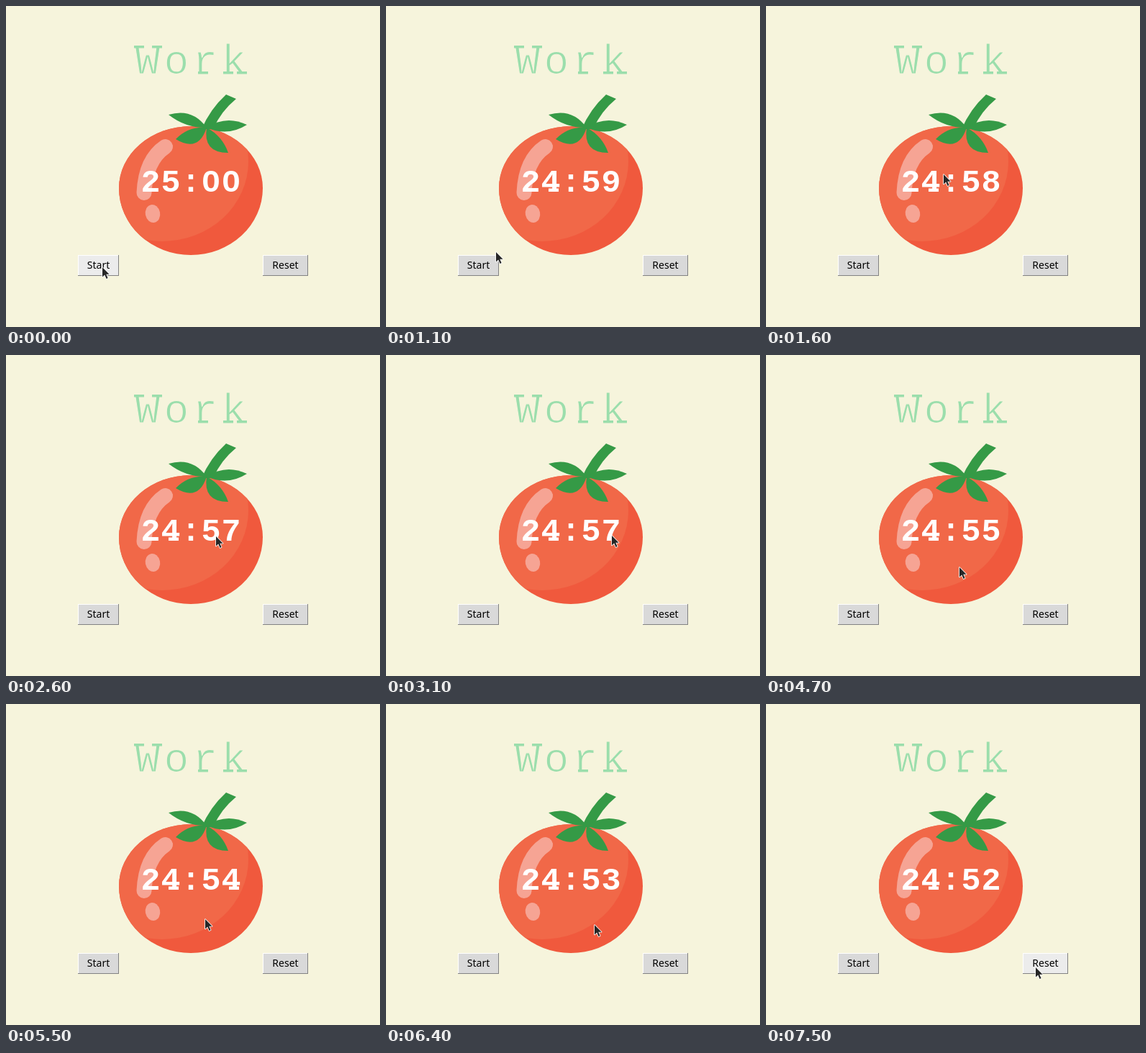
An HTML page with a canvas that plays this animation: 520x446 px, repeating every 8.2 s.

```html
<!DOCTYPE html>
<html lang="en">
<head>
<meta charset="utf-8">
<title>Work timer</title>
<style>
  html, body { margin: 0; width: 100%; height: 100%; overflow: hidden; background: #f6f4dc; }
  canvas { display: block; }
</style>
</head>
<body>
<canvas id="stage" width="520" height="446"></canvas>
<script>
const ctx = document.getElementById('stage').getContext('2d');
const LOOP = 8200, STEP = 100;
const C = {
  paper: '#f6f4dc', mint: '#9bdeac', flesh: '#f16848', shade: '#f0593d',
  shine: '#f6a494', leaf: '#359a46', button: '#d9d9d9', hover: '#ececec', edge: '#828282'
};
const MONO = '"Liberation Mono", monospace';
const HUB = { x: 279, y: 169 };

const stem = new Path2D('M306 123L320 129Q299 146 288 171H272Q284 143 306 123Z');
const gleam = new Path2D('M221.5 195.5Q194 214 192 259.5');
const arrow = new Path2D('M0 0V13.5L3.2 10.6L5.6 16L7.6 15.1L5.3 9.8H9.6Z');

const buttons = [
  { label: 'Start', x: 100, w: 57 },
  { label: 'Reset', x: 357, w: 63 }
];
const BTN_Y = 346, BTN_H = 29;

// Pointer moves: leave, arrive, x, y; it rests in between
const home = { x: 133, y: 361 };
const moves = [
  [1000, 1600, 246, 232], [1600, 1900, 223, 239], [1900, 2200, 277, 251],
  [2300, 3200, 318, 249], [3200, 3600, 210, 281], [3600, 3700, 228, 285],
  [4000, 4300, 248, 318], [4300, 4700, 268, 293], [5000, 6400, 289, 305],
  [6400, 7100, 391, 362], [7200, 7500, 374, 364]
];

function pointerAt(t) {
  let { x, y } = home;
  for (const [leave, arrive, toX, toY] of moves) {
    const k = Math.min(1, Math.max(0, (t - leave) / (arrive - leave)));
    x += (toX - x) * k;
    y += (toY - y) * k;
  }
  return { x: Math.round(x), y: Math.round(y) };
}

function clockAt(t) {
  const left = 1500 - Math.floor((t + 600) / 1000);
  const two = n => String(n).padStart(2, '0');
  return two(Math.floor(left / 60)) + ':' + two(left % 60);
}

function rect(x, y, w, h, color) {
  ctx.fillStyle = color;
  ctx.fillRect(x, y, w, h);
}

function oval(x, y, rx, ry, color, turn = 0) {
  ctx.fillStyle = color;
  ctx.beginPath();
  ctx.ellipse(x, y, rx, ry, turn, 0, Math.PI * 2);
  ctx.fill();
}

// A leaf from the hub to a tip; a and b bow its two edges sideways
function leaf(tipX, tipY, a, b) {
  const dx = tipX - HUB.x, dy = tipY - HUB.y, len = Math.hypot(dx, dy);
  const bow = side => [
    HUB.x + dx / 2 - dy / len * side,
    HUB.y + dy / 2 + dx / len * side
  ];
  ctx.beginPath();
  ctx.moveTo(HUB.x, HUB.y);
  ctx.quadraticCurveTo(...bow(a), tipX, tipY);
  ctx.quadraticCurveTo(...bow(b), HUB.x, HUB.y);
  ctx.fill();
}

function drawTomato() {
  ctx.save();
  ctx.beginPath();
  ctx.ellipse(257, 253, 100, 86, 0, Math.PI, 0);
  ctx.ellipse(257, 253, 100, 93, 0, 0, Math.PI);
  ctx.fillStyle = C.shade;
  ctx.fill();
  ctx.clip();
  oval(217, 216, 120, 111, C.flesh);
  ctx.restore();

  ctx.lineCap = 'round';
  ctx.lineWidth = 21;
  ctx.strokeStyle = C.shine;
  ctx.stroke(gleam);
  oval(204, 288.5, 10.2, 12.6, C.shine, -0.2);

  ctx.fillStyle = C.leaf;
  ctx.fill(stem);
  leaf(226, 151, 20, -10);
  leaf(335, 165, -16, 15);
  leaf(236, 185, 11, -29);
  leaf(309, 204, 27, -9);
}

function drawTitle() {
  ctx.font = '58px ' + MONO;
  ctx.letterSpacing = '5.2px';
  ctx.textAlign = 'left';
  ctx.fillStyle = C.mint;
  ctx.fillText('Work', 179.6, 94);
  // Lighten the strokes, then add slab serifs
  ctx.lineWidth = 1.2;
  ctx.strokeStyle = C.paper;
  ctx.strokeText('Work', 179.6, 94);
  const slab = (x, y) => rect(x - 7, y, 14, 3.5, C.mint);
  for (const x of [185, 210]) slab(x, 55);
  for (const x of [274, 309, 328]) slab(x, 91);
}

function drawClock(text) {
  ctx.font = 'bold 45px ' + MONO;
  ctx.letterSpacing = '1px';
  ctx.textAlign = 'left';
  ctx.fillStyle = '#fff';
  ctx.fillText(text, 187.5, 258);
  // Open zeros and a foot under each four
  [...text].forEach((c, i) => {
    const x = 201 + i * 28;
    if (c === '0') oval(x, 243, 4, 6.5, C.flesh);
    if (c === '4') rect(x - 3, 253.5, 14, 4.5, '#fff');
  });
}

function drawButton({ label, x, w }, p) {
  const over = p.x >= x && p.x < x + w && p.y >= BTN_Y && p.y < BTN_Y + BTN_H;
  rect(x, BTN_Y, w, BTN_H, C.edge);
  rect(x, BTN_Y, w - 1, BTN_H - 1, '#fff');
  rect(x + 1, BTN_Y + 1, w - 2, BTN_H - 2, over ? C.hover : C.button);
  ctx.font = '14px "Noto Sans", sans-serif';
  ctx.letterSpacing = '0px';
  ctx.textAlign = 'center';
  ctx.fillStyle = '#000';
  ctx.fillText(label, x + w / 2, 365);
}

function drawPointer({ x, y }) {
  ctx.save();
  ctx.translate(x + 1, y + 2);
  ctx.lineJoin = 'round';
  ctx.lineWidth = 1.6;
  ctx.strokeStyle = '#fff';
  ctx.stroke(arrow);
  ctx.fillStyle = '#262626';
  ctx.fill(arrow);
  ctx.restore();
}

function draw(t) {
  const p = pointerAt(t);
  rect(0, 0, 520, 446, C.paper);
  drawTitle();
  drawTomato();
  drawClock(clockAt(t));
  for (const b of buttons) drawButton(b, p);
  drawPointer(p);
}

const start = performance.now();
function tick() {
  const t = (performance.now() - start) % LOOP;
  draw(Math.floor(t / STEP) * STEP);
  requestAnimationFrame(tick);
}
tick();
</script>
</body>
</html>
```
